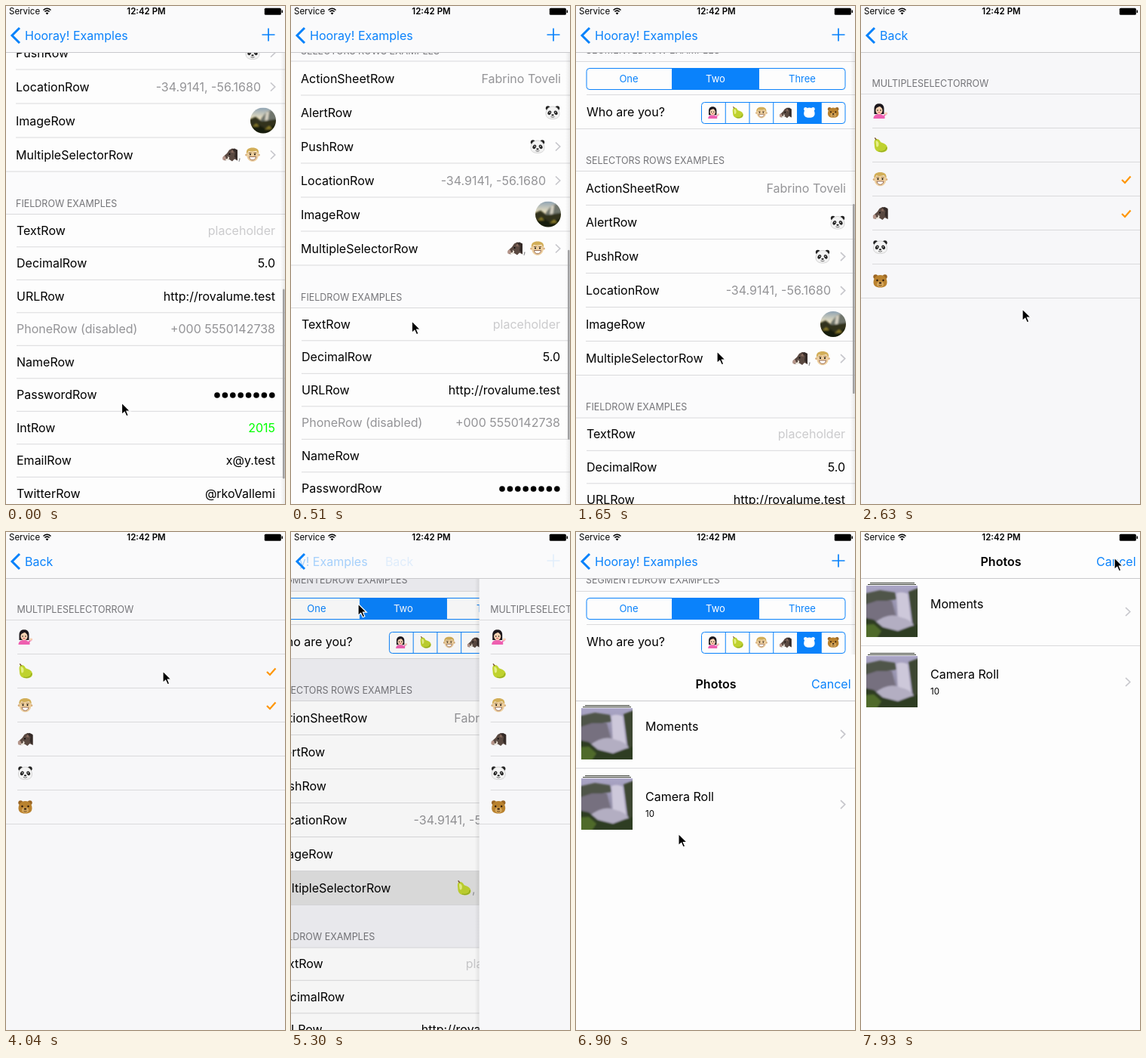
Recreate the animation shown at these times as an HTML page. Size 370 px wide and 659 px high, loop 7990 ms.

```html
<!DOCTYPE html>
<html lang="en">
<head>
<meta charset="utf-8">
<title>Form examples</title>
<style>
  html, body { margin: 0; width: 100%; height: 100%; overflow: hidden; background: #fdfdfd; }
  svg#stage { display: block; width: 100vw; height: 100vh; }
  text { font: 16px Inter, "Open Sans", sans-serif; fill: #000; }
  .head { font-size: 12.5px; fill: #747478; }
  .seg { font-size: 13px; fill: #0a82fb; }
  .small { font-size: 11.5px; }
  .bold { font-weight: 600; }
  .blue { fill: #0a82fb; }
  .grey { fill: #949497; }
  .hint { fill: #cbcbcd; }
  .green { fill: #0f0; }
  .white { fill: #fff; }
  .end { text-anchor: end; }
  .mid { text-anchor: middle; }
  .line { stroke: #dadadc; }
  .edge { stroke: #c9c9cc; }
  .stroke { fill: none; stroke: #0a82fb; }
  .arrow { fill: none; stroke: #c7c7cc; stroke-width: 1.7; }
  .check { fill: none; stroke: #ff9500; stroke-width: 2.2; }
  .press { fill: #dfdfdf; }
</style>
</head>
<body>
<svg id="stage" viewBox="0 0 370 659"></svg>
<script>
const LOOP = 7990, W = 370, H = 659;

// Small pictures, each on a 20 x 20 field
const bearHead = (fur, rim) => `
  <g fill="${rim}"><circle cx="3.8" cy="4.2" r="3"/><circle cx="16.2" cy="4.2" r="3"/></g>
  <path d="M10 2C16 2 19 7 19 11.500C19 16 16 18.500 10 18.500S1 16 1 11.500C1 7 4 2 10 2Z" fill="${fur}"/>`;
const art = {
  lady: `<path d="M2 14V7C2 2 5 .2 8.500 .2S15 2 15 7V14Z" fill="#1d181d"/>
    <path d="M1 20C1 16 4 14 8.500 14S14.500 16 15 20Z" fill="#ee5fb0"/>
    <ellipse cx="8.500" cy="9" rx="4.600" ry="5.200" fill="#f8d3b3"/>
    <path d="M3.500 9C4 4.500 8 5 10 3.500C11 6 13 6 13.500 9L14 4L9 1L4 4Z" fill="#1d181d"/>
    <circle cx="6.600" cy="9" r=".8"/><circle cx="10.400" cy="9" r=".8"/>
    <path d="M7 11.800H10" stroke="#d2465a"/>
    <path d="M13 17L16 14L19.500 12.500L18.500 15L16 16V20H13Z" fill="#ee5fb0"/>
    <path d="M15.500 14.500L16.500 11.500L19.800 12L18 15Z" fill="#f8d3b3"/>`,
  pear: `<path d="M3.500 2.500C6 1 9 2.500 10.500 6C12 7.500 19.500 8 19.500 14C19.500 18 16 19.500 11.500 19.500C6 19.500 2.500 16.500 2.500 12C2.500 9 1 5 3.500 2.500Z" fill="#bfd22f"/>
    <path d="M4 5C5.500 3.500 8 5.500 8 8.500C8 12 6 14 4.800 11.500Z" fill="#e6ef86"/>
    <path d="M8 18C13 19.500 18 18 18.500 13" fill="none" stroke="#93ab20" stroke-width="1.300"/>
    <path d="M4.800 3L2.800 .3" stroke="#77502a" stroke-width="1.400"/>`,
  man: `<circle cx="1.800" cy="10.500" r="1.600" fill="#d6ac78"/><circle cx="18.200" cy="10.500" r="1.600" fill="#d6ac78"/>
    <path d="M2.300 6H17.700V11C17.700 16 14 19.300 10 19.300S2.300 16 2.300 11Z" fill="#eccd9d"/>
    <path d="M2 9C1 3 5 1 10 1S19 3 18 9C17 7 16 6 15 5.200C10 6.500 6 6 5 5.200Z" fill="#d2ae58"/>
    <path d="M5 8H8.500M11.500 8H15" stroke="#85683f"/>
    <circle cx="7" cy="10" r="1"/><circle cx="13" cy="10" r="1"/>
    <path d="M5.500 13H14.500C14 16.300 12 17.300 10 17.300S6 16.300 5.500 13Z" fill="#fff" stroke="#86543a" stroke-width=".8"/>`,
  boar: `<path d="M9 4L13 2L16 3L20 5V18L16 16L13 19L9 16.500L4 18L.5 16L1 13L6 8.500Z" fill="#5a4941"/>
    <path d="M12 3L17 7L16 13L20 18V4L16 2Z" fill="#342a27"/>
    <path d="M.3 13.500L3 11.500L5 15L2.500 18L.5 17Z" fill="#b5958a"/>
    <path d="M4 16C7 16.500 8 14.500 7 12L9 14C9.500 17 6.500 18.500 4 17.500Z" fill="#f4eee2"/>
    <circle cx="9.500" cy="9.500" r="1"/><path d="M11 7L13.500 3.500L15 8Z" fill="#8a6d60"/>`,
  panda: bearHead("#f3f3f3", "#222") +
    `<path d="M10 2C16 2 19 7 19 11.500C19 16 16 18.500 10 18.500S1 16 1 11.500C1 7 4 2 10 2Z" fill="none" stroke="#c5c5c5" stroke-width=".7"/>
    <g fill="#222"><ellipse cx="5.800" cy="10.300" rx="2.200" ry="2.900" transform="rotate(28 5.800 10.300)"/>
    <ellipse cx="14.200" cy="10.300" rx="2.200" ry="2.900" transform="rotate(-28 14.200 10.300)"/>
    <ellipse cx="10" cy="13.300" rx="1.700" ry="1.100"/></g>
    <path d="M7.500 15.500Q10 17 12.500 15.500" fill="none" stroke="#444" stroke-width=".8"/>
    <circle cx="6.200" cy="9.800" r=".7" fill="#fff"/><circle cx="13.800" cy="9.800" r=".7" fill="#fff"/>`,
  bear: bearHead("#b9822f", "#9a6524") +
    `<ellipse cx="10" cy="14" rx="4.500" ry="3.600" fill="#d9ab60"/><ellipse cx="10" cy="12.500" rx="1.800" ry="1.200" fill="#3a2412"/>
    <circle cx="6" cy="9" r="1.200" fill="#2b1a0c"/><circle cx="14" cy="9" r="1.200" fill="#2b1a0c"/>
    <path d="M8 15.500Q10 16.500 12 15.500" fill="none" stroke="#6b431a"/>`,
  blank: bearHead("#fff", "#fff")
};
const people = ["lady", "pear", "man", "boar", "panda", "bear"];

const emoji = (name, cx, cy, size = 20) =>
  `<g transform="translate(${cx - size / 2} ${cy - size / 2}) scale(${size / 20})">${art[name]}</g>`;
const text = (x, y, s, cls = "") => `<text x="${x}" y="${y}" dy=".36em" class="${cls}">${s}</text>`;
const rect = (x, y, w, h, attrs) => `<rect x="${x}" y="${y}" width="${w}" height="${h}" ${attrs}/>`;
const line = (x, y, cls = "line") => `<path d="M${x} ${y}H${W}" class="${cls}"/>`;
const arrow = y => `<path d="M351 ${y - 5.5}l5.700 5.500l-5.700 5.500" class="arrow"/>`;
const group = (id, body, attrs = "") => `<g id="${id}" ${attrs}>${body}</g>`;

function segments(y, edges, chosen) {
  const left = edges[0], width = edges[edges.length - 1] - left;
  const dividers = edges.slice(1, -1).map(x => `M${x} ${y}v28`).join("");
  return rect(left, y, width, 28, 'rx="4" class="stroke"') +
    rect(edges[chosen], y, edges[chosen + 1] - edges[chosen], 28, 'class="blue"') +
    `<path d="${dividers}" class="stroke"/>`;
}

function picture() {
  return `<g clip-path="url(#round)"><rect x="324" y="409" width="34" height="34" fill="url(#dusk)"/>
    <g filter="url(#soft)"><path d="M338 424L346 414L360 411V430H338Z" fill="#6f746c"/>
    <path d="M345 415L349 414L347 428L343 428Z" fill="#d8d3c4"/>
    <path d="M322 425L331 421L339 427L360 424V446H322Z" fill="#30331a"/>
    <path d="M322 436L334 431L344 437L360 431V446H322Z" fill="#191b0e"/>
    <path d="M327 434l5-4l4 4zM343 438l6-5l4 4z" fill="#8a7c2c"/></g></g>`;
}

function mainPage() {
  const cells = [14, 127.5, 242.5, 357], faces = [0, 1, 2, 3, 4, 5, 6].map(i => 166.5 + i * 31.75);
  const selectors = ["ActionSheetRow", "AlertRow", "PushRow", "LocationRow", "ImageRow", "MultipleSelectorRow"];
  const fields = [
    ["TextRow", "placeholder", "hint"], ["DecimalRow", "5.0"], ["URLRow", "http://rovalume.test"],
    ["PhoneRow (disabled)", "+000 5550142738", "grey"], ["NameRow", ""], ["PasswordRow", ""],
    ["IntRow", "2015", "green"], ["EmailRow", "x@y.test"], ["TwitterRow", "@rkoVallemi"]
  ];
  let s = rect(0, 0, W, 960, 'fill="#fdfdfd"');
  s += group("bands", rect(0, 40, W, 38, "") + rect(0, 168, W, 56, "") + rect(0, 494, W, 56, ""));
  s += text(13, 63, "SEGMENTEDROW EXAMPLES", "head") + line(0, 78.5);
  s += segments(87.5, cells, 1) + text(70, 101, "One", "seg mid") +
    text(185, 101, "Two", "seg mid white") + text(300, 101, "Three", "seg mid");
  s += line(14, 122.5) + text(14, 145.5, "Who are you?") + segments(132.5, faces, 4);
  people.forEach((p, i) => s += emoji(i === 4 ? "blank" : p, faces[i] + 15.9, 146, 16));
  s += line(0, 167.5) + text(13, 209.5, "SELECTORS ROWS EXAMPLES", "head") + line(0, 223.5);
  s += rect(0, 449, W, 45, 'id="rowPress" class="press"');
  selectors.forEach((name, i) => {
    s += text(13, 246.5 + i * 45, name) + line(i < 5 ? 13 : 0, 268.5 + i * 45);
  });
  s += text(358, 246.5, "Fabrino Toveli", "grey end") + emoji("panda", 347, 291.5) +
    emoji("panda", 327, 336.5) + text(338, 381.5, "-34.9141, -56.1680", "grey end") + picture() +
    arrow(336.5) + arrow(381.5) + arrow(471.5);
  s += emoji("man", 327, 471) + text(307.5, 472, ",", "grey") + group("before", emoji("boar", 297, 471)) +
    group("after", emoji("panda", 296, 471) + text(276, 472, ",", "grey") + emoji("pear", 265, 471));
  s += text(13, 535.5, "FIELDROW EXAMPLES", "head") + line(0, 550);
  fields.forEach(([name, value, cls = ""], i) => {
    const y = 571.7 + i * 43.5;
    s += text(14, y, name, cls === "grey" ? cls : "") + text(357, y, value, "end " + cls) + line(14, 593.3 + i * 43.5);
  });
  for (let i = 0; i < 8; i++) s += `<circle cx="${280 + i * 10.4}" cy="789.500" r="3.800"/>`;
  return s;
}

function choicePage() {
  let s = rect(-6, 61, 6, H, 'fill="url(#shade)"') + rect(0, 61, W, H, 'fill="#f7f7f9"');
  s += text(14.5, 102, "MULTIPLESELECTORROW", "head") + line(0, 116.5);
  people.forEach((p, i) => {
    const y = 139 + i * 45;
    s += rect(0, y - 22, W, 45, `id="tap-${p}" class="press"`) + emoji(p, 25.5, y) +
      `<path id="check-${p}" d="M346 ${y + 1}l4 4l7.500 -8.500" class="check"/>` + line(i < 5 ? 15 : 0, y + 22.5);
  });
  return s;
}

function album(y, name, count) {
  return `<path d="M12 ${y - 3.5}H71M9 ${y - 1.5}H73" stroke="#33382f"/>
    <svg x="7" y="${y}" width="68" height="68" viewBox="0 0 68 68">
    <rect width="68" height="68" fill="url(#mist)"/><g filter="url(#soft)">
    <path d="M-4 11L18 6L38 9L40 18L16 22L-4 34Z" fill="#4f5549"/>
    <path d="M-4 26L14 20L34 20L40 44L-4 52Z" fill="#76707f"/>
    <path d="M56 8L72 2V66L62 52Z" fill="#3c4630"/>
    <path d="M40 10Q48 7 55 11L60 50L42 52Z" fill="#cdc8da"/>
    <path d="M10 50Q30 34 46 42Q58 44 64 54L40 62Z" fill="#b3aec2"/>
    <path d="M-4 42L10 45L22 55L42 60L58 54L72 50V72H-4Z" fill="#2f3d20"/>
    <path d="M-4 52L10 51L20 60L12 72H-4Z" fill="#4f6a2c"/></g></svg>` +
    text(92, y + 24.5, name) + text(92, y + 47, count, "small") + arrow(y + 34.5);
}

const modal = rect(0, 0, W, H, 'fill="#fdfdfd"') + line(0, 61.5, "edge") +
  text(185.5, 39, "Photos", "bold mid") + text(364.5, 39, "Cancel", "blue end") +
  album(71, "Moments", "") + line(0, 150.5) + album(164, "Camera Roll", "10");

const nav = rect(0, 0, W, 61, 'fill="#fafafb"') + line(0, 61.5, "edge") +
  `<svg x="12" y="20" width="358" height="41" viewBox="12 20 358 41">` +
  group("title", text(25, 39, "Hooray! Examples", "blue")) + group("back", text(25, 39, "Back", "blue")) + `</svg>
  <path d="M18 29L8 39L18 49" class="stroke" stroke-width="3"/>
  <path id="plus" d="M339.500 38h17M348 29.500v17" class="stroke" stroke-width="1.700"/>`;

const status = text(4, 7.3, "Service", "small") + text(186, 7.3, "12:42 PM", "small bold mid") +
  `<path d="M49.500 5.500Q54.500 1 59.500 5.500M51.300 7.500Q54.500 4.700 57.700 7.500" fill="none" stroke="#000" stroke-width="1.500"/>
  <path d="M52.600 9.200Q54.500 7.700 56.400 9.200L54.500 11.500Z"/>
  <rect x="342.800" y="2.800" width="22" height="9" rx="1.500"/><path d="M365.500 5.500h1.500v3.500h-1.500z"/>`;

const stage = document.getElementById("stage");
stage.innerHTML = `<defs>
  <clipPath id="round"><circle cx="341" cy="426" r="17"/></clipPath>
  <filter id="soft"><feGaussianBlur stdDeviation="1.300"/></filter>
  <linearGradient id="dusk" x2="0" y2="1"><stop stop-color="#8fa3b3"/><stop offset=".45" stop-color="#f0e4c2"/></linearGradient>
  <linearGradient id="mist" x2="0" y2="1"><stop stop-color="#aaa5c6"/><stop offset="1" stop-color="#7c788a"/></linearGradient>
  <linearGradient id="shade"><stop stop-color="#000" stop-opacity="0"/><stop offset="1" stop-color="#000" stop-opacity=".08"/></linearGradient>
  </defs>` +
  group("main", group("list", mainPage()) + rect(0, 0, W, H, 'id="dim"')) +
  rect(367, 0, 2.5, 251, 'id="bar" rx="1.200" fill="#a9a9ab"') +
  group("choice", choicePage()) + nav + group("modal", modal) + status +
  group("cursor", `<path d="M0 0V15.500L3.700 12.200L6.200 17.800L8.800 16.700L6.400 11.200H11.300Z" stroke="#fff" stroke-width="1.200"/>`);

const $ = id => document.getElementById(id);
const move = (id, x, y) => $(id).setAttribute("transform", `translate(${x} ${y})`);
const fade = (id, v) => $(id).setAttribute("opacity", v);
const clamp = v => Math.min(1, Math.max(0, v));
const spring = ms => ms <= 0 ? 0 : ms > 600 ? 1 : 1 - (1 + ms * .015) * Math.exp(-ms * .015);
const pulse = (t, on, off, fall) => t < on ? 0 : 1 - clamp((t - off) / fall);

// Drag, then momentum that dies away
const scrollAt = t => t < 600
  ? -274.5 + 155.3 * clamp((t - 50) / 550) ** 1.275
  : t < 2010 ? -119.2 * Math.exp((600 - t) / 331) : 0;

const pointer = [
  [50, 153.5, 525], [220, 157, 300], [620, 161, 443], [1030, 161, 443], [1650, 187, 457], [1850, 188, 463],
  [2050, 188, 463], [2630, 214, 401], [3040, 214, 318], [3280, 214, 318], [3390, 212, 272], [3480, 212, 272],
  [3640, 208, 184], [4040, 208, 184], [4240, 205, 318], [4380, 205, 318], [4780, 110, 80], [4980, 32, 38],
  [5120, 32, 38], [5300, 89, 95], [5660, 108, 210], [6080, 139, 424], [6800, 139, 424],
  [7300, 110, 191], [7400, 110, 191], [7840, 336, 28], [7930, 336, 34]
];
function pointerAt(t) {
  const i = pointer.findIndex(k => k[0] > t);
  if (i < 1) return pointer[i ? pointer.length - 1 : 0].slice(1);
  const a = pointer[i - 1], b = pointer[i], u = (t - a[0]) / (b[0] - a[0]), e = u * u * (3 - 2 * u);
  return [a[1] + (b[1] - a[1]) * e, a[2] + (b[2] - a[2]) * e];
}

const taps = { boar: 3400, pear: 3640, panda: 4270 };
const preset = ["man", "boar"];

function draw(t) {
  const p = spring(t - 2010) - spring(t - 5146), y = scrollAt(t);
  const sliding = (t > 2010 && t < 2600) || (t > 5100 && t < 5660);
  move("list", 0, y);
  move("main", -111 * p, 0);
  fade("dim", .1 * p);
  $("bands").setAttribute("fill", sliding ? "#efeff4" : "#fbfbfc");
  move("bar", 0, 260 - .417 * y);
  fade("bar", 1 - clamp((t - 1750) / 250));
  fade("rowPress", pulse(t, 1900, 5600, 250));
  fade("before", t < 4000 ? 1 : 0);
  fade("after", t < 4000 ? 0 : 1);

  move("choice", W * (1 - p), 0);
  for (const name of people) {
    const tap = taps[name] ?? Infinity;
    fade("tap-" + name, pulse(t, tap, tap + 60, 120));
    fade("check-" + name, preset.includes(name) !== (t > tap + 60) ? 1 : 0);
  }
  move("title", -185 * p, 0);
  fade("title", clamp(1 - 2 * p));
  move("back", 148 * (1 - p), 0);
  fade("back", p * p);
  fade("plus", (1 - p) ** 6);

  move("modal", 0, H * (1 - spring(t - 6720)));
  move("cursor", ...pointerAt(t));
}

let start;
function tick() {
  const now = performance.now();
  start ??= now;
  draw((now - start) % LOOP);
  requestAnimationFrame(tick);
}
tick();
</script>
</body>
</html>
```
